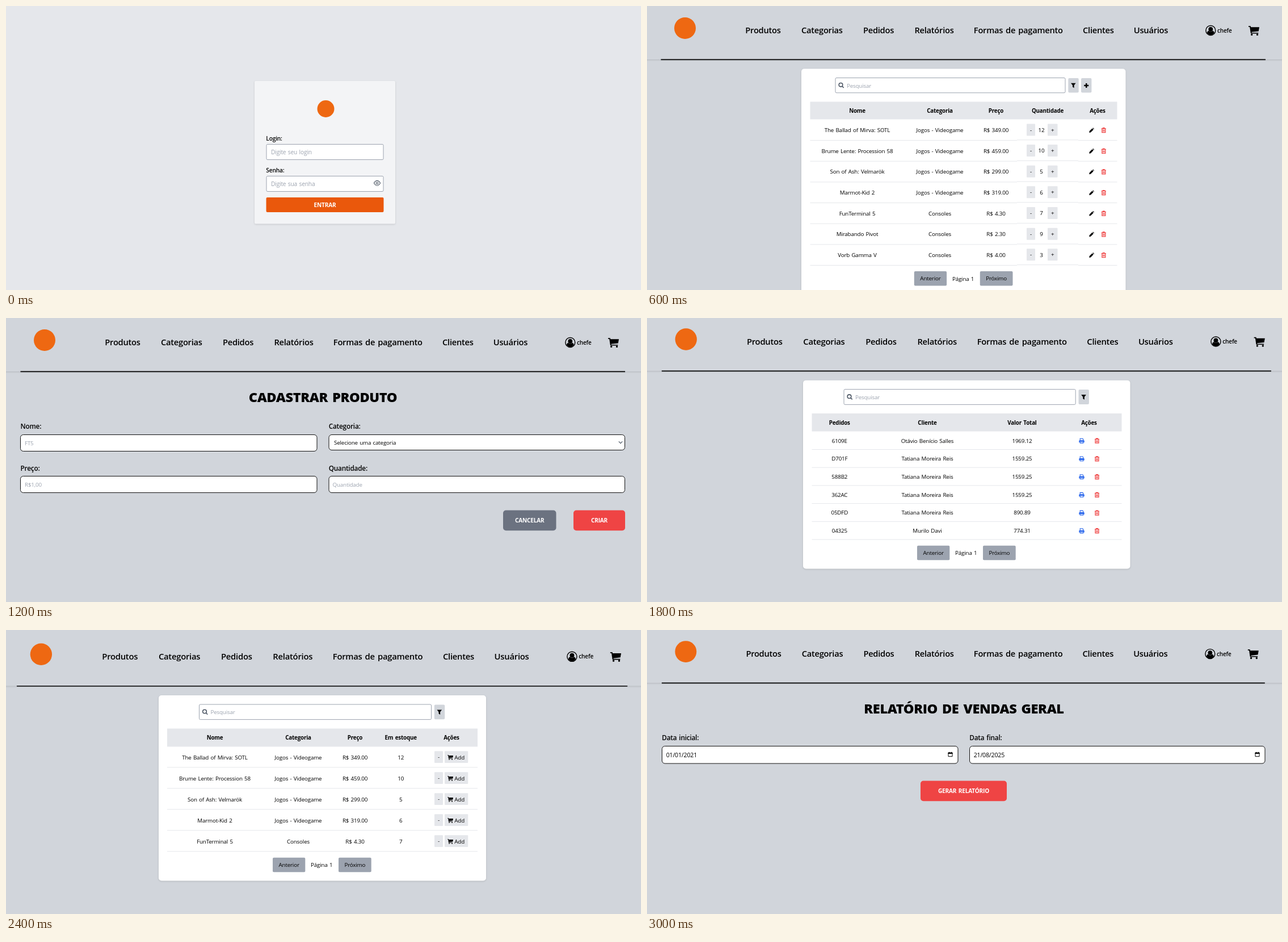
An HTML page that plays this animation: 1119x500 px, repeating every 3.6 s.

```html
<!DOCTYPE html>
<html lang="pt-BR">
<head>
<meta charset="utf-8">
<title>Loja</title>
<style>
html, body { margin: 0; width: 100%; height: 100%; overflow: hidden; background: #d1d5db; }
svg { display: block; width: 1119px; height: 500px; }
text { font-family: "Open Sans", "Noto Sans", sans-serif; letter-spacing: -.018em; word-spacing: .1em; white-space: pre; }
.shadow { filter: drop-shadow(0 1.5px 1.5px rgba(0, 0, 0, .14)); }
</style>
</head>
<body>
<svg id="stage" viewBox="0 0 1119 500"></svg>
<script>
const STEP = 600;
const C = {
  page: '#d1d5db', soft: '#e5e7eb', mid: '#9ca3af', slate: '#6b7280', field: '#111',
  red: '#ef4444', blue: '#2563eb', orange: '#ea580c', mark: '#ee6812', ink: '#000'
};

// Drawing helpers
const rect = (x1, y1, x2, y2, fill, r = 0, extra = '') =>
  `<rect x="${x1}" y="${y1}" width="${x2 - x1}" height="${y2 - y1}" rx="${r}" fill="${fill}" ${extra}/>`;
const line = (x1, y, x2, color, w = 1) =>
  `<path d="M${x1} ${y}H${x2}" stroke="${color}" stroke-width="${w}"/>`;
const text = (x, y, str, { size = 9.8, weight = 400, fill = C.ink, anchor = 'middle' } = {}) =>
  `<text x="${x}" y="${y}" font-size="${size}" font-weight="${weight}" fill="${fill}" text-anchor="${anchor}">${str}</text>`;
const left = (x, y, str, opt = {}) => text(x, y, str, { ...opt, anchor: 'start' });
const box = (x1, y1, x2, y2, stroke, r) => rect(x1, y1, x2, y2, '#fff', r, `stroke="${stroke}"`);
const button = (x1, y1, x2, y2, fill, label, opt = {}, r = 2) =>
  rect(x1, y1, x2, y2, fill, r) + text((x1 + x2) / 2, (y1 + y2) / 2 + 3.6, label, opt);
const white = { size: 10.1, weight: 700, fill: '#fff' };

const solid = d => c => `<path d="${d}" fill="${c}"/>`;
const stroke = (d, w) => c => `<path d="${d}" fill="none" stroke="${c}" stroke-width="${w}"/>`;
const icons = {
  trash: stroke('M-4-2.8H4M-1.4-2.8V-4H1.4V-2.8M-3-2.8V4H3V-2.8M-1-1V2.6M1-1V2.6', 1.25),
  pencil: solid('M-4.3 4.3L-3.8 1.6 1-3.2 3.2-1-1.6 3.8ZM1.7-3.8L2.5-4.5 4.5-2.5 3.8-1.7Z'),
  funnel: solid('M-4.3-4.3H4.3L1.3-.5V4.3L-1.3 2.5V-.5Z'),
  plus: stroke('M-4 0H4M0-4V4', 2.4),
  search: stroke('M2.5-.8A3.3 3.3 0 1 1-4.1-.8A3.3 3.3 0 1 1 2.5-.8M1.5 1.5L4.4 4.4', 1.6),
  eye: stroke('M-5.6 0Q0-8.8 5.6 0Q0 8.8-5.6 0ZM1.8 0A1.8 1.8 0 1 1-1.8 0A1.8 1.8 0 1 1 1.8 0', 1.1),
  chevron: stroke('M-3.2-1.6L0 1.6 3.2-1.6', 1.2),
  calendar: c => stroke('M-3.5-2.8H3.5V3.7H-3.5Z', 1)(c) + solid('M-4-3.3H4V-1H-4ZM-2.6-4.2H-1.4V-3H-2.6ZM1.4-4.2H2.6V-3H1.4Z')(c),
  print: c => stroke('M-2.8-.5V-3.9H1.6L2.8-2.7V-.5M-2.8 1.5H2.8V3.9H-2.8Z', 1.1)(c) +
    solid('M-4.7 2.7V.3Q-4.7-1-3.4-1H3.4Q4.7-1 4.7.3V2.7H3.2V1H-3.2V2.7Z')(c),
  user: c => stroke('M8.5 0A8.5 8.5 0 1 1-8.5 0A8.5 8.5 0 1 1 8.5 0', 1.4)(c) +
    solid('M3.9-2A3.9 3.9 0 1 1-3.9-2A3.9 3.9 0 1 1 3.9-2M-6.4 4.6Q-5.8.9-3.6.7Q0 3.9 3.6.7Q5.8.9 6.4 4.6Q0 12-6.4 4.6')(c),
  cart: c => solid('M-9.5-8.2H-5.8L-5.3-6.2H9.5L8.2 1-4 2.4-3.8 3.5H7.8V5.1H-5.4L-5.9 3.2-7.3-6.5H-9.5Z' +
    'M-2.1 7A1.7 1.7 0 1 1-5.5 7A1.7 1.7 0 1 1-2.1 7M7.7 7A1.7 1.7 0 1 1 4.3 7A1.7 1.7 0 1 1 7.7 7')(c)
};
const icon = (name, x, y, color = C.ink, s = 1) =>
  `<g transform="translate(${x} ${y}) scale(${s})">${icons[name](color)}</g>`;
const logo = (x, y, r) => `<circle cx="${x}" cy="${y}" r="${r}" fill="${C.mark}"/>`;

// Shared page parts
const nav = [['Produtos', 204.5], ['Categorias', 308.3], ['Pedidos', 408], ['Relatórios', 506],
  ['Formas de pagamento', 654.3], ['Clientes', 795.3], ['Usuários', 888]];

const header = (dx, dy, s) => rect(0, 0, 1119, 500, C.page) +
  `<g transform="translate(${dx} ${dy}) scale(${s})">` +
  rect(-40, -20, 1180, 94, C.page, 0, 'class="shadow"') +
  line(24.5, 94.4, 1090, C.ink, 1.6) + logo(67, 39, 19) +
  nav.map(([name, x]) => text(x, 48.2, name, { size: 14.7, weight: 600 })).join('') +
  icon('user', 993.3, 43) + left(1005, 46.6, 'chefe', { size: 10, weight: 600 }) +
  icon('cart', 1069.5, 43.4) + '</g>';

const card = (x1, y1, x2, y2) => rect(x1, y1, x2, y2, '#fff', 5, 'class="shadow"');

const searchBar = (x1, y1, x2, y2) => {
  const mid = (y1 + y2) / 2;
  return box(x1, y1, x2, y2, C.mid, 2) + icon('search', x1 + 10.3, mid, '#4b5563') +
    left(x1 + 20, mid + 4, 'Pesquisar', { fill: C.mid }) +
    rect(x2 + 5.3, y1 + .4, x2 + 23.7, y2 - .4, C.page, 2) + icon('funnel', x2 + 14.3, mid + .4);
};

const tableHead = (x1, y1, x2, y2, cols) => rect(x1, y1, x2, y2, C.soft) +
  cols.map(([name, x]) => text(x, (y1 + y2) / 2 + 3.8, name, { weight: 700 })).join('');

const tableRows = (rows, x1, x2, top, step, lineDy, cells) => rows.map((row, i) => {
  const y = top + i * step;
  return line(x1, y + lineDy, x2, C.soft) + cells(row, y);
}).join('');

const pager = (x, y) => button(x, y, x + 57.3, y + 25.5, C.mid, 'Anterior') +
  text(x + 86.3, y + 16.5, 'Página 1') + button(x + 116, y, x + 173.7, y + 25.5, C.mid, 'Próximo');

const heading = (y, str) => text(558.5, y, str, { size: 23.6, weight: 800 });
const label = (x, y, str, size = 11.8) => left(x, y, str, { size, weight: 600 });
const hint = (x, y, str) => left(x, y, str, { fill: C.mid });

// Data
const products = [
  ['The Ballad of Mirva: SOTL', 'Jogos - Videogame', '349.00', 12],
  ['Brume Lente: Procession 58', 'Jogos - Videogame', '459.00', 10],
  ['Son of Ash: Velmarök', 'Jogos - Videogame', '299.00', 5],
  ['Marmot-Kid 2', 'Jogos - Videogame', '319.00', 6],
  ['FunTerminal 5', 'Consoles', '4.30', 7],
  ['Mirabando Pivot', 'Consoles', '2.30', 9],
  ['Vorb Gamma V', 'Consoles', '4.00', 3]
];
const buyer = 'Tatiana Moreira Reis';
const orders = [
  ['6109E', 'Otávio Benício Salles', '1969.12'], ['D701F', buyer, '1559.25'],
  ['588B2', buyer, '1559.25'], ['362AC', buyer, '1559.25'],
  ['05DFD', buyer, '890.89'], ['04325', 'Murilo Davi', '774.31']
];
const productCells = ([name, kind, price], y, xs) =>
  text(xs[0], y + 3.6, name) + text(xs[1], y + 3.6, kind) + text(xs[2], y + 3.6, 'R$ ' + price);

// Scenes
const login = () => rect(0, 0, 1119, 500, C.soft) +
  rect(438, 132, 686, 383.5, '#f3f4f6', 2, 'class="shadow"') + logo(563.5, 181, 15) +
  label(458.3, 237, 'Login:', 10.2) + box(459, 243.5, 665, 270.5, C.mid, 2) +
  left(467, 261.2, 'Digite seu login', { size: 10.2, fill: C.mid }) +
  label(458.3, 293, 'Senha:', 10.2) + box(459, 299.5, 665, 326.5, C.mid, 2) +
  left(467, 317.2, 'Digite sua senha', { size: 10.2, fill: C.mid }) +
  icon('eye', 654, 311.8, '#4b5563') +
  button(458.5, 337, 665.5, 363, C.orange, 'ENTRAR', white);

const productList = () => header(0, 0, 1) + card(272, 110.5, 843.5, 520) +
  searchBar(332, 126.5, 737, 152.8) + rect(765, 127, 783.4, 152.4, C.page, 2) + icon('plus', 774.2, 140) +
  tableHead(287.5, 168.5, 828.5, 199.5,
    [['Nome', 370.5], ['Categoria', 516], ['Preço', 615], ['Quantidade', 706], ['Ações', 794]]) +
  tableRows(products, 287.5, 652, 218.4, 36.65, 18.2, (row, y) =>
    line(652, y + 17.4, 760, C.soft) + line(760, y + 18.2, 828.5, C.soft) +
    productCells(row, y, [370.5, 516, 615]) +
    button(669, y - 11, 684, y + 10, C.soft, '-', {}, 1) + text(695, y + 3.2, row[3]) +
    button(706, y - 11, 723.5, y + 10, C.soft, '+', {}, 1) +
    icon('pencil', 783.5, y + .3) + icon('trash', 804.8, y + .2, C.red)) +
  pager(470.8, 467);

const productForm = () => header(1, 0, 1) + heading(148.2, 'CADASTRAR PRODUTO') +
  label(25.5, 195.2, 'Nome:') + box(25.5, 205.5, 548, 234.5, C.field, 5) + hint(33, 224, 'FT5') +
  label(568.7, 195.2, 'Categoria:') + box(569, 205.5, 1090.5, 232.5, C.field, 5) +
  left(578, 223.4, 'Selecione uma categoria') + icon('chevron', 1083, 219, '#4b5563') +
  label(25.5, 268.6, 'Preço:') + box(25.5, 278.5, 548, 307.5, C.field, 5) + hint(33, 297.4, 'R$1,00') +
  label(568.7, 268.6, 'Quantidade:') + box(569, 278.5, 1090.5, 307.5, C.field, 5) + hint(575.5, 297.4, 'Quantidade') +
  button(876, 338.5, 969.5, 374.3, C.slate, 'CANCELAR', white, 5) +
  button(1000, 338.5, 1091, 374.3, C.red, 'CRIAR', white, 5);

const orderList = () => header(1.2, -1.8, 1.008) + card(275, 109.7, 851.5, 441.5) +
  searchBar(347, 125.6, 755.2, 152.4) +
  tableHead(290.5, 168, 836.5, 199.6,
    [['Pedidos', 339.3], ['Cliente', 494], ['Valor Total', 661], ['Ações', 779]]) +
  tableRows(orders, 290.5, 836.5, 216, 31.7, 15.5, ([code, who, total], y) =>
    text(339.3, y + 3.6, code) + text(494, y + 3.6, who) + text(661, y + 3.6, total) +
    icon('print', 766, y + .2, C.blue) + icon('trash', 793, y + .2, C.red)) +
  pager(476, 400.8);

const stockList = () => header(-5.8, 3.4, 1.01) + card(269, 115, 846, 441.5) +
  searchBar(340.5, 131, 749.5, 157.6) +
  tableHead(284, 173.5, 831, 205.4,
    [['Nome', 368], ['Categoria', 515], ['Preço', 615], ['Em estoque', 695.7], ['Ações', 785]]) +
  tableRows(products.slice(0, 5), 284, 831, 224, 37, 17.8, (row, y) =>
    productCells(row, y, [368, 515, 615]) + text(695.7, y + 3.6, row[3]) +
    button(755, y - 10.7, 770, y + 10, C.soft, '-', {}, 1) +
    rect(773, y - 10.7, 814.2, y + 10, C.soft, 1) + icon('cart', 783, y + .2, C.ink, .52) +
    left(790.3, y + 3.6, 'Add')) +
  pager(470, 400.8);

const report = () => header(1.5, -.8, .9975) + heading(147.2, 'RELATÓRIO DE VENDAS GERAL') +
  [['Data inicial:', '01/01/2021', 26.5, 548], ['Data final:', '21/08/2025', 568.5, 1089]].map(([name, date, x1, x2]) =>
    label(x1 - .3, 194.2, name) + box(x1, 204.5, x2, 235, C.field, 5) +
    left(x1 + 7.2, 223.9, date, { size: 10.6 }) + icon('calendar', x2 - 13.5, 219)).join('') +
  button(482, 265.6, 634, 301.2, C.red, 'GERAR RELATÓRIO', white, 5);

const stage = document.getElementById('stage');
stage.innerHTML = [login, productList, productForm, orderList, stockList, report]
  .map(scene => `<g>${scene()}</g>`).join('');
const scenes = [...stage.children];
const start = performance.now();

function draw() {
  const now = Math.floor((performance.now() - start) / STEP) % scenes.length;
  scenes.forEach((g, i) => { g.style.display = i === now ? '' : 'none'; });
  requestAnimationFrame(draw);
}
draw();
</script>
</body>
</html>
```
